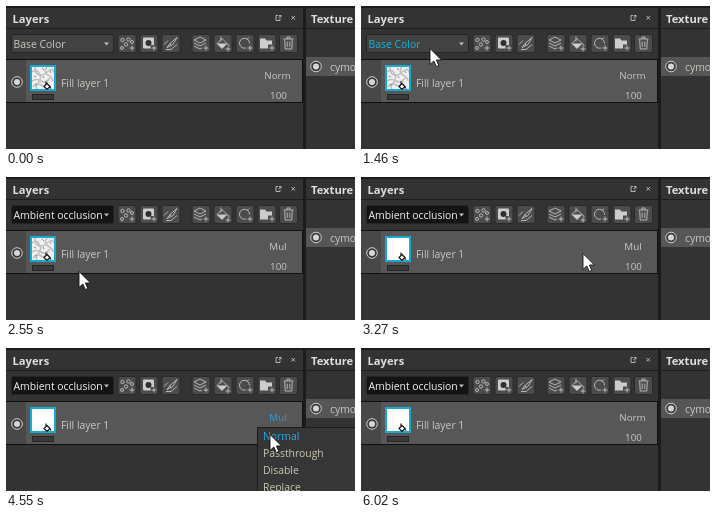
Recreate the animation shown at these times as an HTML page. Size 349 by 143 pixels, loop 6560 ms.

```html
<!DOCTYPE html>
<html lang="en">
<head>
<meta charset="utf-8">
<title>Layers panel</title>
<style>
html, body { margin: 0; width: 100%; height: 100%; overflow: hidden; background: #1c1c1c; }
svg { display: block; width: 349px; height: 143px; }
text { font: 10.4px "Open Sans", "Noto Sans", sans-serif; fill: #c9c8c2; }
.title { font-weight: 700; font-size: 11.2px; fill: #dedede; }
.mid { text-anchor: middle; font-size: 9.8px; }
.menu text { fill: #cbc7b4; }
.icon { fill: none; stroke: #c2c2c2; stroke-width: .9; }
.icon .solid { fill: #cdcdcd; stroke: none; }

/* Every change is a hard cut within one shared loop. */
.a { animation: 6560ms step-end infinite; }
.combo { animation-name: combo; }
.base { animation-name: base; }
.chosen { animation-name: chosen; fill: #f4f4f4; }
.channels { animation-name: channels; }
.i0 { animation-name: i0; }
.i1 { animation-name: i1; }
.i2 { animation-name: i2; }
.i3 { animation-name: i3; }
.norm { animation-name: norm; }
.mul { animation-name: mul; }
.modes { animation-name: modes; }
.pick { animation-name: pick; }
.opacity { animation-name: opacity; }
.blank { animation-name: blank; }
.cursor { animation-name: cursor; }

@keyframes combo { 0% { fill: #424242; } 25%, 100% { fill: #141414; } }
@keyframes base {
  0% { fill: #c9c8c2; opacity: 1; }
  16.61% { fill: #10b6e0; }
  25% { fill: #f4f4f4; opacity: 1; }
  38.87%, 100% { fill: #f4f4f4; opacity: 0; }
}
@keyframes chosen { 0% { opacity: 0; } 38.87%, 100% { opacity: 1; } }
@keyframes channels { 0% { opacity: 0; } 25% { opacity: 1; } 38.87%, 100% { opacity: 0; } }
@keyframes i0 { 0% { fill: #cbc7b4; } 25% { fill: #20aeea; } 30.48%, 100% { fill: #cbc7b4; } }
@keyframes i1 { 0% { fill: #cbc7b4; } 30.48% { fill: #20aeea; } 33.23%, 100% { fill: #cbc7b4; } }
@keyframes i2 { 0% { fill: #cbc7b4; } 33.23% { fill: #20aeea; } 36.12%, 100% { fill: #cbc7b4; } }
@keyframes i3 { 0% { fill: #cbc7b4; } 36.12% { fill: #20aeea; } 38.87%, 100% { fill: #cbc7b4; } }
@keyframes norm { 0% { opacity: 1; } 38.87% { opacity: 0; } 72.1%, 100% { opacity: 1; } }
@keyframes mul {
  0% { opacity: 0; fill: #c9c8c2; }
  38.87% { opacity: 1; fill: #c9c8c2; }
  52.58% { opacity: 1; fill: #3498dc; }
  72.1%, 100% { opacity: 0; fill: #c9c8c2; }
}
@keyframes modes { 0% { opacity: 0; } 58.07% { opacity: 1; } 72.1%, 100% { opacity: 0; } }
@keyframes pick { 0% { fill: #cbc7b4; } 66.61% { fill: #20aeea; } 72.1%, 100% { fill: #cbc7b4; } }
@keyframes opacity { 0% { fill: #c9c8c2; } 72.1% { fill: #10b6e0; } 86.12%, 100% { fill: #c9c8c2; } }
@keyframes blank { 0% { opacity: 0; } 44.35%, 100% { opacity: 1; } }
@keyframes cursor {
  0% { transform: translate(76px, 160px); }
  11.12% { transform: translate(76px, 126px); }
  13.87% { transform: translate(75px, 94px); }
  16.61% { transform: translate(72px, 58px); }
  19.5% { transform: translate(69px, 42px); }
  27.74% { transform: translate(67px, 55px); }
  30.48% { transform: translate(66px, 71px); }
  33.23% { transform: translate(69px, 83px); }
  36.12% { transform: translate(73px, 94px); }
  44.35% { transform: translate(92px, 94px); }
  47.1% { transform: translate(150px, 88px); }
  49.84% { transform: translate(222px, 76px); }
  52.58% { transform: translate(267px, 66px); }
  55.33% { transform: translate(271px, 61px); }
  63.71% { transform: translate(271px, 72px); }
  66.61% { transform: translate(268px, 84px); }
  69.35% { transform: translate(264px, 86px); }
  74.84% { transform: translate(263px, 86px); }
  83.38% { transform: translate(271px, 92px); }
  86.12% { transform: translate(293px, 110px); }
  88.87% { transform: translate(313px, 132px); }
  91.76%, 100% { transform: translate(313px, 160px); }
}
</style>
</head>
<body>
<svg viewBox="0 0 349 143">
  <defs>
    <rect id="btn" x="-9" y="-9" width="18" height="18" rx="2" fill="#4b4b4b" stroke="#292929"/>
    <g id="eye">
      <circle r="5.3" fill="#3b3b3b" stroke="#cfcfcf"/>
      <circle r="3" fill="#d6d6d6"/>
    </g>
    <path id="plus" d="M2.5 4.5h5M5 2v5"/>
    <clipPath id="thumb"><rect x="26" y="61" width="22" height="22"/></clipPath>
    <clipPath id="field"><rect x="6" y="29" width="92" height="18"/></clipPath>
  </defs>

  <!-- panels -->
  <rect width="349" height="143" fill="#1c1c1c"/>
  <path d="M0 2h297v141H0zM300 2h49v141h-49z" fill="#333"/>
  <path d="M0 22.5h297M300 22.5h49" stroke="#1d1d1d"/>
  <rect x="-.5" y="53.5" width="297" height="43" fill="#575757" stroke="#101010"/>
  <rect y="54" width="20" height="42" fill="#484848"/>
  <rect x="300" y="51" width="49" height="19" fill="#565656"/>
  <text class="title" x="6.5" y="16.5">Layers</text>
  <text class="title" x="305" y="16.5">Texture</text>
  <g fill="none" stroke="#c4c4c4" stroke-width=".9">
    <path d="M272 9.5h-2v5h4v-2M272.5 12l2.5-2.5M273 9.500h2v2"/>
    <path d="M285.5 10l3.500 3.500M289 10l-3.500 3.500"/>
  </g>

  <!-- channel selector -->
  <rect class="a combo" x="5.5" y="28.5" width="102" height="18" rx="1.5" stroke="#252525"/>
  <g clip-path="url(#field)">
    <text class="a base" x="7.5" y="41.5">Base Color</text>
    <text class="a chosen" x="7.5" y="41.5">Ambient occlusion</text>
  </g>
  <path d="M98 36.5h5l-2.5 3z" fill="#bdbdbd"/>

  <!-- toolbar -->
  <g class="icon">
    <g transform="translate(121 37.5)">
      <use href="#btn"/>
      <circle cx="-4.5" cy="-3.5" r="1.7"/><circle cx="1.5" cy="-4" r="1.7"/><circle cx="-1" cy="1" r="1.7"/>
      <circle cx="-5" cy="4.5" r="1.5"/><circle cx="5" cy="-1.5" r="1.5"/>
      <use href="#plus"/>
    </g>
    <g transform="translate(143 37.5)">
      <use href="#btn"/>
      <rect class="solid" x="-6" y="-6" width="11" height="11" rx="1"/>
      <circle cx="-.5" cy="-.5" r="3" fill="#303030" stroke="none"/>
      <path d="M1.500 1.500h6v6h-6z" fill="#4b4b4b" stroke="none"/>
      <use href="#plus"/>
    </g>
    <g transform="translate(165 37.5)">
      <use href="#btn"/>
      <path d="M6-6L-1 0L0 2L2 1zM-1 0L-4 4L0 2M-7 1L-3-3M-5 6H0L6 1"/>
    </g>
    <g transform="translate(195 37.5)">
      <use href="#btn"/>
      <path d="M-1-6.5L5-3.500L-1-.5L-7-3.500zM-7-.5L-1 2.500L5-.5M-7 2.500L-1 5.500L1 4.500"/>
      <use href="#plus"/>
    </g>
    <g transform="translate(217 37.5)">
      <use href="#btn"/>
      <path d="M-1-5L4 0L-1 5L-6 0zM-2-2V-7M4 0Q6.500 1 6 3"/>
      <path class="solid" d="M-6 0H4L-1 5z"/>
      <use href="#plus" y="1"/>
    </g>
    <g transform="translate(239 37.5)">
      <use href="#btn"/>
      <path d="M1 4.500A5 5 0 1 1 4.500 0M2-4L4-6"/>
      <use href="#plus"/>
    </g>
    <g transform="translate(261 37.5)">
      <use href="#btn"/>
      <path class="solid" d="M-7-5h5l1.500 2H5V1H1V5H-7z"/>
      <use href="#plus"/>
    </g>
    <g transform="translate(282.5 37.5)">
      <use href="#btn"/>
      <path d="M-5-4.500H5M-1.500-4.500V-6.500H1.500V-4.500M-3.800-4L-3.300 5.500H3.300L3.800-4M-1.300-2V3.500M1.300-2V3.500"/>
    </g>
  </g>

  <!-- fill layer -->
  <use href="#eye" x="11" y="76"/>
  <rect x="25" y="60" width="24" height="24" fill="#f0f0f0" stroke="#17a9cf" stroke-width="2"/>
  <g clip-path="url(#thumb)" fill="none">
    <path d="M26 66q5-4 7 1t8-1t8 2M29 61q0 7 4 8t-1 8t4 8M41 61q-4 5 1 8t5 6M26 75q5-3 9 0t9-3M27 81q4-5 8-2t7-4" stroke="#c0c0c0" stroke-width="1.6"/>
    <path d="M36 62l2 2M28 70l2 1M37 70l1 2M44 65l1 2M29 78l2 1" stroke="#8a8a8a"/>
  </g>
  <rect class="a blank" x="26" y="61" width="22" height="22" fill="#fff"/>
  <path d="M41 77.500l3 3-3 3-3-3zM40 78.500v-3" fill="#fff" stroke="#111" stroke-width="1.2"/>
  <path d="M44 80l1.500 2.500h-2z" fill="#111"/>
  <rect x="26.5" y="88.5" width="21" height="5" fill="#3a3a3a" stroke="#252525"/>
  <text x="55" y="80.5">Fill layer 1</text>
  <text class="mid a norm" x="271.5" y="73">Norm</text>
  <text class="mid a mul" x="272" y="73">Mul</text>
  <text class="mid a opacity" x="272.5" y="93">100</text>

  <use href="#eye" x="310" y="60.5"/>
  <text x="324" y="64.5">cymo</text>

  <!-- menus -->
  <g class="menu a channels">
    <path d="M5.5 47.5h102V144H5.5z" fill="#363636" stroke="#1b1b1b"/>
    <text class="a i0" x="8" y="58">Base Color</text>
    <text class="a i1" x="8" y="71">Metallic</text>
    <text class="a i2" x="8" y="84">Roughness</text>
    <text class="a i3" x="8" y="97">Ambient occlusion</text>
    <text x="8" y="110">Normal</text>
    <text x="8" y="123">Height</text>
  </g>
  <g class="menu a modes">
    <path d="M251.5 79.5H350V144H251.5z" fill="#363636" stroke="#1b1b1b"/>
    <text class="a pick" x="257" y="92">Normal</text>
    <text x="257" y="109">Passthrough</text>
    <text x="257" y="126">Disable</text>
    <text x="257" y="143">Replace</text>
  </g>

  <path class="a cursor" d="M0 .5V16.5L3.800 13L6.300 18.500L8.800 17.500L6.400 12H11.500z" fill="#fff" stroke="#111" stroke-width=".9"/>
</svg>
</body>
</html>
```
